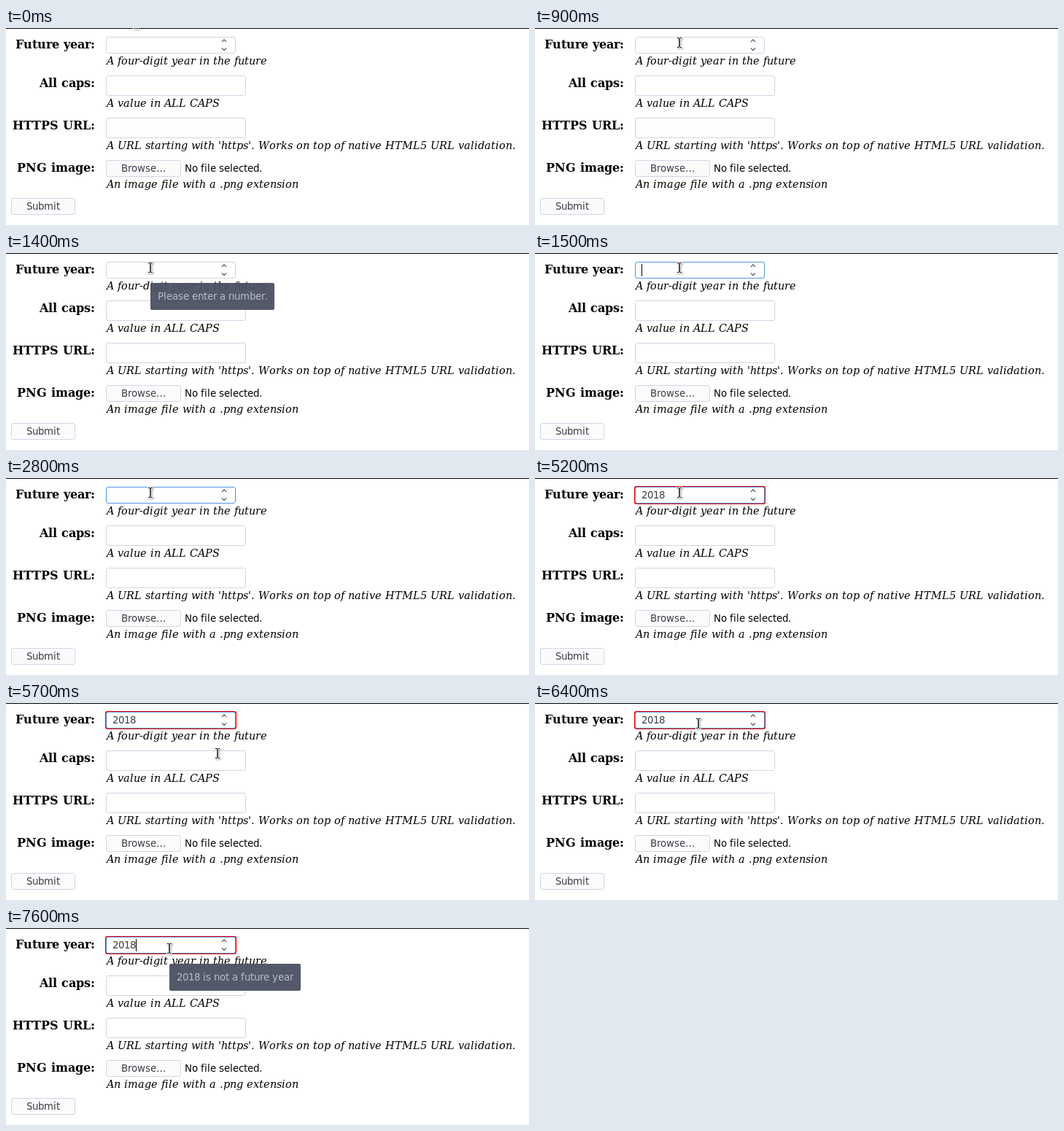
These frames come from a looping animation (717 by 270 pixels, 8 s). An HTML page with a canvas:

```html
<!DOCTYPE html>
<html lang="en">
<head>
<meta charset="utf-8">
<title>Form validation</title>
<style>
  html, body { margin: 0; width: 717px; height: 270px; overflow: hidden; background: #fff; }
  canvas { display: block; }
</style>
</head>
<body>
<canvas id="stage" width="717" height="270"></canvas>
<script>
const ctx = document.getElementById('stage').getContext('2d');
const LOOP = 8000, STEP = 100;
const LABEL = 'bold 16px "DejaVu Serif", serif';
const HELP = 'italic 14.4px "DejaVu Serif", serif';
const SANS = '13.333px "DejaVu Sans", sans-serif';
const BORDER = '#cfd6e6', FOCUS = '#5294e2', INK = '#3b3e45';

const rows = [
  ['Future year:', 28, 'A four-digit year in the future', 50],
  ['All caps:', 81, 'A value in ALL CAPS', 108],
  ['HTTPS URL:', 139, "A URL starting with 'https'. Works on top of native HTML5 URL validation.", 166],
  ['PNG image:', 197, 'An image file with a .png extension', 219]
];
const caretOn = [[1500, 2800], [4000, 5200], [5800, 6400], [7600, LOOP]];
const detour = [[214, 28], [248, 46], [278, 63], [290, 69], [284, 64], [262, 50], [238, 35], [224, 28]];

// Hinted text: every glyph advances by whole pixels.
const advance = ch => Math.round(ctx.measureText(ch).width);

function text(str, x, y, font, color = '#000', alignRight = false) {
  ctx.font = font;
  ctx.fillStyle = color;
  const chars = [...str];
  if (alignRight) x -= chars.reduce((sum, ch) => sum + advance(ch), 0);
  for (const ch of chars) {
    ctx.fillText(ch, x, y);
    x += advance(ch);
  }
}

function box(x, y, w, h, fill, stroke) {
  ctx.beginPath();
  ctx.roundRect(x + 0.5, y + 0.5, w - 1, h - 1, 2.5);
  ctx.fillStyle = fill;
  ctx.fill();
  ctx.lineWidth = 1;
  ctx.strokeStyle = stroke;
  ctx.stroke();
}

function chevron(x, y, rise) {
  ctx.beginPath();
  ctx.moveTo(x - 3, y);
  ctx.lineTo(x, y + rise);
  ctx.lineTo(x + 3, y);
  ctx.lineWidth = 1.3;
  ctx.strokeStyle = '#5c616c';
  ctx.stroke();
}

function glow(x, y, w, h) {
  ctx.save();
  ctx.filter = 'blur(0.75px)';
  ctx.fillStyle = '#f00';
  ctx.beginPath();
  ctx.roundRect(x - 1, y - 1, w + 2, h + 2, 3);
  ctx.fill();
  ctx.restore();
}

function yearField(t) {
  const focused = t >= 1500;
  const typed = t < 4400 ? '' : '2018'.slice(0, Math.floor((t - 4400) / 200) + 1);
  if (typed) glow(137, 12, 178, 23);
  box(137, 12, 178, 23, '#fff', focused ? FOCUS : BORDER);
  text(typed, 146, 28, SANS, INK);
  chevron(299, 19, -3);
  chevron(299, 27.5, 3);
  if (caretOn.some(([a, b]) => t >= a && t < b)) {
    ctx.fillStyle = '#000';
    ctx.fillRect(146 + 8 * typed.length, 15, 1, 17);
  }
}

function form(t) {
  ctx.fillStyle = '#fff';
  ctx.fillRect(0, 0, 717, 270);
  ctx.fillStyle = '#000';
  ctx.fillRect(0, 0, 717, 1);
  yearField(t);
  box(137, 65, 192, 28, '#fff', BORDER);
  box(137, 123, 192, 28, '#fff', BORDER);
  box(137, 181, 103, 23, '#fbfbfc', BORDER);
  box(7, 233, 88, 23, '#fbfbfc', BORDER);
  text('Browse…', 158, 197, SANS, INK);
  text('No file selected.', 245, 197, SANS);
  text('Submit', 28, 249, SANS, INK);
  for (const [label, y, help, helpY] of rows) {
    text(label, 122, y, LABEL, '#000', true);
    text(help, 138, helpY, HELP);
  }
}

function tooltip(str, x, y, w) {
  ctx.fillStyle = 'rgba(75,81,98,0.95)';
  ctx.beginPath();
  ctx.roundRect(x, y, w, 37, 2);
  ctx.fill();
  text(str, x + 10, y + 23, SANS, '#b4bcc8');
}

function pointerAt(t) {
  if (t >= 5400) return detour[Math.min(7, Math.floor((t - 5400) / STEP))];
  const n = Math.max(0, Math.min(5, Math.floor((t - 500) / STEP) + 1));
  const p = 1 - (1 - n / 5) ** 2;
  return [Math.round(178 + 20 * p), Math.round(-6 + 26 * p)];
}

function pointer([x, y]) {
  const beam = (grow, color) => {
    const bar = (bx, by, w, h) => ctx.rect(bx - grow, by - grow, w + 2 * grow, h + 2 * grow);
    ctx.beginPath();
    for (const serifY of [y - 7, y + 6]) {
      bar(x - 3, serifY, 2.5, 1);
      bar(x + 0.5, serifY, 2.5, 1);
    }
    bar(x - 0.7, y - 6, 1.4, 12);
    ctx.fillStyle = color;
    ctx.fill();
  };
  ctx.save();
  ctx.shadowColor = 'rgba(0,0,0,0.35)';
  ctx.shadowBlur = 2;
  ctx.shadowOffsetX = ctx.shadowOffsetY = 1;
  beam(1, '#fff');
  ctx.restore();
  beam(0, '#000');
}

function draw(t) {
  form(t);
  if (t >= 1400 && t < 1500) tooltip('Please enter a number.', 198, 41, 170);
  if (t >= 6600) tooltip('2018 is not a future year', 224, 49, 180);
  pointer(pointerAt(t));
}

function tick() {
  draw(performance.now() % LOOP);
  requestAnimationFrame(tick);
}
tick();
</script>
</body>
</html>
```
